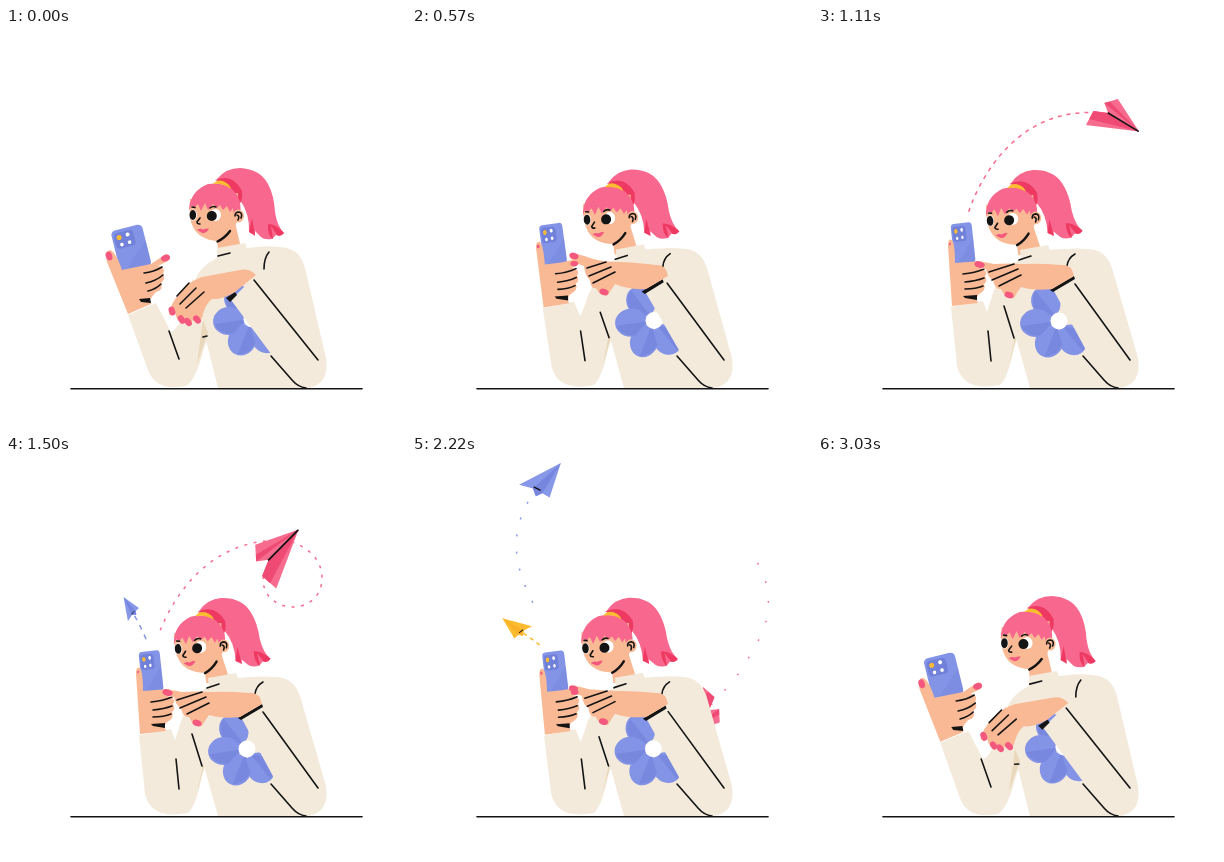
Write an HTML page that moves like this. It is 400x400 px and loops after 3060 ms.

```html
<!DOCTYPE html>
<html lang="en">
<head>
<meta charset="utf-8">
<title>Sending messages</title>
<style>
  html, body { margin: 0; width: 100%; height: 100%; overflow: hidden; background: #fff; }
  svg { display: block; width: 100vw; height: 100vh; }
  .ink { fill: none; stroke: #141414; stroke-width: 1.6; stroke-linecap: round; stroke-linejoin: round; }
  .jaw { stroke-width: 2.4; }
  .cloth { fill: #f3eadb; }
  .skin { fill: #f9b994; }
  .hair { fill: #f8678e; }
  .deep { fill: #ee3a62; }
  .nail { fill: #f4587f; }
  .gold { fill: #fdbb30; }
  .blue { fill: #8393e5; }
  .navy { fill: #7180d9; }
  .white { fill: #fff; }
  .black { fill: #141414; }
  .trail { fill: none; stroke-width: 1.5; }
</style>
</head>
<body>
<svg viewBox="0 0 400 400">
  <g id="planes"></g>

  <g id="head">
    <path class="hair" d="M211 151 Q220 140 234 140 Q254 141 262 156 Q268 167 269 184 Q271 198 278 205 Q275 209 270 207 L266 211 Q258 212 255 209 L249 203 L249 208 L243 204 Q244 186 234 172 Z"/>
    <path class="deep" d="M262 196 Q270 196 278 205 Q275 209 271 207 L265 198 L267 211 Q261 207 262 196 Z M209 152 Q227 145 236 163 Q237 172 233 177 Q230 158 209 152 Z M246 190 L249 207 L243 204 Z"/>
    <path class="skin" d="M211 209 L228 190 L235 220 L212 224 Z"/>
    <path class="skin" d="M184 171 Q182 190 187 199 Q193 211 210 213 Q223 211 231 194 L232 165 Z"/>
    <path class="ink jaw" d="M211.500 213.500 Q219 210 224 203"/>
    <g id="open">
      <ellipse class="white" cx="187" cy="187" rx="3.800" ry="5.500"/>
      <ellipse class="white" cx="209.500" cy="187" rx="5.500" ry="6"/>
      <ellipse class="black" cx="186.800" cy="187" rx="3.300" ry="5"/>
      <circle class="black" cx="205.800" cy="188" r="5"/>
    </g>
    <path class="hair" d="M183 182 Q184 163 202 156 Q222 153 231 167 Q236 176 234 185 L228 187 L227 180 L224 184 L221 178 L217 182 L214 177 L211 180 L207 176 L202 182 L199 175 L195 183 L192 176 L188 180 L186 177 Z"/>
    <path class="gold" d="M207 156 Q211 151 217 153 Q224 156 225 161 Q217 155 207 156 Z"/>
    <ellipse class="skin" cx="232.500" cy="188" rx="5.500" ry="6.500"/>
    <path class="ink" d="M229 188 Q229 184 233 184 Q237 185 235 190 M231 187 Q234 188 232 192"/>
    <path class="ink" d="M186 179 L189 179.500 M204 180 Q207 177.500 210 179"/>
    <path id="shut" class="ink" d="M182 187 Q186 193 191 190 M199 189 Q206 196 213 187"/>
    <path class="ink" d="M194 190 L191 194 Q191 196 194 196"/>
    <path class="nail" d="M191 202 Q195 200 197 201.500 Q200 200 203 200.500 Q200 206 196 205 Z"/>
  </g>

  <path id="torso" class="cloth"/>
  <path id="arm" class="cloth"/>
  <path id="shade" fill="#e9d8bc"/>
  <g id="flower"></g>
  <path id="sleeve" class="cloth"/>
  <path id="seams" class="ink"/>
  <path class="ink" d="M265 328 L286 352 Q292 359 300 360"/>

  <g id="phone">
    <rect class="blue" x="-16" y="-21" width="32" height="43" rx="4.500"/>
    <path class="navy" opacity=".3" d="M16 -4 L16 17 Q16 22 11 22 L-12 22 Z"/>
    <rect class="navy" x="-14" y="-18" width="20" height="16" rx="4"/>
    <circle class="gold" cx="-9" cy="-13" r="2.500"/>
    <circle class="white" cx="0" cy="-14" r="2"/>
    <circle class="white" cx="-8" cy="-5.500" r="1.800"/>
    <circle class="white" cx="0" cy="-6" r="1.800"/>
  </g>
  <path id="holder" class="skin"/>
  <path id="cuffs" class="black"/>
  <path id="holderLines" class="ink"/>
  <path id="pointer" class="skin"/>
  <path id="pointerLines" class="ink"/>
  <g id="nails"></g>
  <path class="ink" d="M65 360.800 H356"/>
</svg>

<script>
const LOOP = 3060, STEP = 30;
const NS = 'http://www.w3.org/2000/svg';
const $ = id => document.getElementById(id);

function add(parent, tag, attrs) {
  const el = document.createElementNS(NS, tag);
  for (const key in attrs) el.setAttribute(key, attrs[key]);
  return parent.appendChild(el);
}

const clamp = x => Math.min(1, Math.max(0, x));
const lerp = (a, b, k) => a + (b - a) * k;
const ease = x => (1 - Math.cos(Math.PI * clamp(x))) / 2;

// Piecewise linear value through [time, value] pairs.
function track(keys, t) {
  if (t <= keys[0][0]) return keys[0][1];
  for (let i = 1; i < keys.length; i++) {
    const [t0, v0] = keys[i - 1], [t1, v1] = keys[i];
    if (t <= t1) return lerp(v0, v1, (t - t0) / (t1 - t0));
  }
  return keys[keys.length - 1][1];
}

// Blend two paths that share one structure.
function blend(a, b, k) {
  const ends = b.match(/-?[\d.]+/g);
  let i = 0;
  return a.replace(/-?[\d.]+/g, n => lerp(+n, +ends[i++], k).toFixed(2));
}

// Each part: pose with the phone held away, pose with the phone held close.
const poses = {
  torso: [
    'M211 220 L239 215 L241 220 Q268 216 284 221 Q295 225 299 240 L320 330 Q324 356 302 360 L212 360 L200 312 L188 268 Q184 244 211 230 Z',
    'M202 222 L230 217 L232 222 Q262 219 277 222 Q289 225 294 240 L320 330 Q324 356 302 360 L212 360 L198 310 L186 268 Q180 240 203 231 Z'],
  arm: [
    'M122 287 L150 275 L165 304 Q173 300 178 284 L187 250 L206 300 L198 320 Q190 352 180 358 Q150 364 142 342 Z',
    'M133 279 L165 273 L169 284 Q172 275 176 262 L190 240 L204 296 L196 320 Q190 350 182 357 Q145 364 139 338 Z'],
  shade: [
    'M197 292 L202 305 L191 336 Z',
    'M197 309 L198 311 L191 336 Z'],
  sleeve: [
    'M225 272 L247 250 L314 333 L302 360 Q288 358 280 346 Z',
    'M236 263 L258 248 L314 333 L302 360 Q288 358 281 346 Z'],
  seams: [
    'M248 252 L312 332 M263 224 Q258 230 258 241 M212 228 L224 225 M163 303 L173 331 M197 309 L201 308',
    'M257 256 L312 332 M257 226 Q250 230 249 238 M201 232 L213 228 M170 303 L173 333 M186 278 L196 310'],
  holder: [
    'M122 286 L101 234 Q98 223 104 222 Q110 224 116 242 L145 236 L160 226 Q167 228 162 233 L152 238 Q160 238 157 246 Q160 251 155 255 Q158 262 150 264 Q146 268 144 272 L145 276 Z',
    'M134 278 L130 218 Q130 210 134 212 Q137 216 137 235 L150 234 L163 233 Q170 236 164 240 L162 240 Q171 243 167 248 Q170 253 166 256 Q169 262 160 267 Q158 270 159 272 L160 275 Z'],
  cuffs: [
    'M133 271 L144 270 L145 275 L135 274 Z M220 270 L229 264 L231 267 L224 274 Z',
    'M145 268 L159 267 L159 272 L147 270 Z M232 262 L256 248 L257 251 L235 264 Z'],
  holderLines: [
    'M138 245 Q148 244 156 239 M140 255 Q150 253 157 247 M142 263 Q150 261 155 256',
    'M145 246 Q157 245 166 241 M147 254 Q158 253 166 250 M147 261 Q158 261 165 258']
};

// The pointing hand: drooping, finger raised beside the phone, finger tapping.
const gestures = {
  pointer: [
    'M250 247 Q243 240 234 242 Q212 246 196 249 Q184 253 176 262 Q164 276 163 286 Q166 290 169 284 Q171 297 178 291 Q182 300 187 292 Q195 297 197 286 Q200 275 206 271 Q216 272 229 264 Z',
    'M256 248 Q254 236 244 237 Q220 234 206 234 Q190 234 178 230 Q162 224 157 226 Q158 234 172 238 Q173 248 178 252 Q179 262 184 260 Q188 269 196 267 Q199 262 203 256 Q216 262 234 261 Z',
    'M256 248 Q254 236 244 237 Q220 235 205 236 Q190 235 176 236 Q162 233 158 234 Q160 241 168 241 Q170 250 175 252 Q177 262 183 261 Q188 272 196 270 Q199 264 203 259 Q216 263 234 261 Z'],
  pointerLines: [
    'M171 268 L183 255 M174 276 L190 260 M180 280 L198 264',
    'M175 240 L194 234 M177 248 L199 239 M181 255 L203 244',
    'M171 244 L196 236 M174 252 L200 241 M181 258 L203 247']
};

// Nails as [x, y, angle, size] in successive poses.
const makeNail = keys => ({ keys, el: add($('nails'), 'ellipse', { class: 'nail', rx: 4.6, ry: 3.2 }) });
const holderNails = [
  [[103, 228, 70, 1], [132, 216, 85, .3]],
  [[159.5, 230, -20, 1], [163, 237, 0, .8]]
].map(makeNail);
const pointerNails = [
  [[166, 283, 70, 1], [162, 228, 15, 1], [161, 236.5, 15, 1]],
  [[175.5, 291.5, 60, 1], [176, 248, 40, 0], [174, 250, 40, 0]],
  [[182, 294, 50, 1], [184, 258, 30, 0], [183, 260, 30, 0]],
  [[191, 291.5, 50, 1], [192, 264, 15, 1], [191, 267, 15, 1]]
].map(makeNail);

function placeNail({ el }, from, to, k) {
  const [x, y, angle, size] = from.map((v, i) => lerp(v, to[i], k));
  el.setAttribute('transform', `translate(${x} ${y}) rotate(${angle}) scale(${size})`);
}

// Only the petals left of the sleeve show.
for (const angle of [235, 55, 115, 175]) {
  const transform = `rotate(${angle})`;
  add($('flower'), 'ellipse', { class: 'blue', cx: 23, rx: 16, ry: 14, transform });
  add($('flower'), 'path', { class: 'navy', opacity: .6, d: 'M6 0 L38 -2 Q33 -13 20 -13 Z', transform });
}
add($('flower'), 'circle', { class: 'white', r: 8.5 });

const creased = {
  body: 'M30 0 L-20 19 L-20 3 L-6 -2 L-14 -9 L-4 -19 Z',
  under: 'M30 0 L-20 12 L-20 3 L-6 -2 Z M30 0 L-14 -9 L-10 -13 Z',
  fold: 'M-6 -2 L29 0'
};
const flat = {
  body: 'M30 0 L-18 18 L-11 4 L-15 -4 L-8 -7 L-6 -16 Z',
  under: 'M30 0 L-11 4 L-15 -4 L-8 -7 Z',
  fold: 'M-9 4 L-7 -3'
};

const flights = [
  {
    light: '#f66b8e', dark: '#ee4a74', flip: 1, shape: creased,
    d: 'M148 192 C160 150 200 78 282 85 C296 88 316 100 316 122 C316 142 300 152 284 151 C266 149 254 135 258 118 C262 106 272 96 290 80 C308 64 332 78 345 106 C360 130 360 160 346 185 C336 204 324 224 309 238 C298 250 288 262 270 280',
    head: [[620, 0], [1110, 200], [1500, 359], [2220, 633], [2400, 670]],
    tail: [[620, 0], [1110, 4], [1500, 18], [2220, 445], [2480, 665]],
    size: [[620, 0], [760, .6], [1000, 1], [1300, 1], [1500, 1.18], [1800, 1.1], [2220, .95], [2400, .7], [2460, 0]],
    pitch: [[1110, 9], [1500, 9.5], [2220, 20]],
    dash: [[1110, 4], [1500, 3], [2220, 1.6]]
  },
  {
    light: '#8798e8', dark: '#7685de', flip: -1, shape: flat,
    d: 'M144 193 C136 172 129 160 121 147 C103 112 97 80 116 46 C122 36 130 28 140 17',
    head: [[1350, 0], [1500, 44], [1800, 122], [2160, 178], [2220, 181], [2460, 186]],
    tail: [[1350, 0], [1500, 3], [2220, 48], [2500, 186]],
    size: [[1350, 0], [1500, .48], [1800, .9], [2280, .92], [2460, 0]],
    pitch: [[1500, 10.5], [2220, 17.3]],
    dash: [[1500, 5], [2220, 2]]
  },
  {
    light: '#fdbb30', dark: '#f9b228', flip: 1, shape: flat,
    d: 'M134 194 C122 184 115 180 100 169 C70 150 55 135 53 94 C52 75 53 65 48 50 C45 42 40 36 36 32',
    head: [[2130, 0], [2220, 36], [2670, 160], [2940, 200]],
    tail: [[2130, 0], [2220, 2], [2670, 5], [2980, 200]],
    size: [[2130, 0], [2220, .6], [2500, .85], [2860, .85], [2990, 0]],
    pitch: [[2220, 8], [2670, 17.5]],
    dash: [[2220, 4], [2670, 2]]
  }
].map(f => {
  f.trail = add($('planes'), 'path', { class: 'trail', d: f.d, stroke: f.light });
  f.length = f.trail.getTotalLength();
  f.plane = add($('planes'), 'g', {});
  add(f.plane, 'path', { fill: f.light, d: f.shape.body });
  add(f.plane, 'path', { fill: f.dark, d: f.shape.under });
  add(f.plane, 'path', { class: 'ink', d: f.shape.fold });
  return f;
});

// A zero-length dash and a gap place the first visible dash on the path.
function dashes(from, to, pitch, dash) {
  const parts = [];
  let end = 0;
  for (let s = Math.ceil(from / pitch) * pitch; s + dash < to; s += pitch) {
    parts.push(s - end, dash);
    end = s + dash;
  }
  return [0, ...parts, 2000].map(n => n.toFixed(2));
}

function drawFlight(f, t) {
  const size = track(f.size, t);
  const head = Math.min(track(f.head, t), f.length - 1);
  const tail = track(f.tail, t);
  const at = f.trail.getPointAtLength(head);
  const a = f.trail.getPointAtLength(Math.max(0, head - 1));
  const b = f.trail.getPointAtLength(head + 1);
  const angle = Math.atan2(b.y - a.y, b.x - a.x) * 180 / Math.PI;
  f.plane.setAttribute('transform', `translate(${at.x} ${at.y}) rotate(${angle}) scale(${size} ${size * f.flip})`);
  f.plane.setAttribute('display', size > 0 ? 'inline' : 'none');

  const pattern = dashes(tail, head - 8 * size, track(f.pitch, t), track(f.dash, t));
  const visible = head > 0 && pattern.length > 2;
  f.trail.setAttribute('display', visible ? 'inline' : 'none');
  f.trail.setAttribute('stroke-dasharray', pattern.join(' '));
}

// The finger is raised by the time the phone is four fifths of the way in.
function drawPointer(near) {
  const raised = .8;
  const step = near < raised ? 0 : 1;
  const k = step ? (near - raised) / (1 - raised) : Math.sin(near / raised * Math.PI / 2);
  for (const id in gestures) {
    $(id).setAttribute('d', blend(gestures[id][step], gestures[id][step + 1], k));
  }
  for (const nail of pointerNails) placeNail(nail, nail.keys[step], nail.keys[step + 1], k);
}

function draw(t) {
  const near = ease(t / 810) * (1 - ease((t - 1995) / 1150));

  for (const id in poses) $(id).setAttribute('d', blend(...poses[id], near));
  $('head').setAttribute('transform', `translate(${-14.5 * near} ${4 * near}) rotate(${-5 * near} 208 190)`);
  $('flower').setAttribute('transform', `translate(${lerp(246, 241, near)} ${lerp(291, 293, near)})`);
  $('phone').setAttribute('transform',
    `translate(${lerp(125, 145, near)} ${lerp(220, 215, near)}) rotate(${lerp(-14, -6, near)}) scale(${lerp(1, .66, near)} ${lerp(1, .95, near)})`);

  for (const nail of holderNails) placeNail(nail, ...nail.keys, near);
  drawPointer(near);

  const blink = t >= 2580 && t < 2760;
  $('open').setAttribute('display', blink ? 'none' : 'inline');
  $('shut').setAttribute('display', blink ? 'inline' : 'none');

  flights.forEach(f => drawFlight(f, t));
}

const start = performance.now();
function tick() {
  const t = (performance.now() - start) % LOOP;
  draw(Math.floor(t / STEP) * STEP);
  requestAnimationFrame(tick);
}
tick();
</script>
</body>
</html>
```
